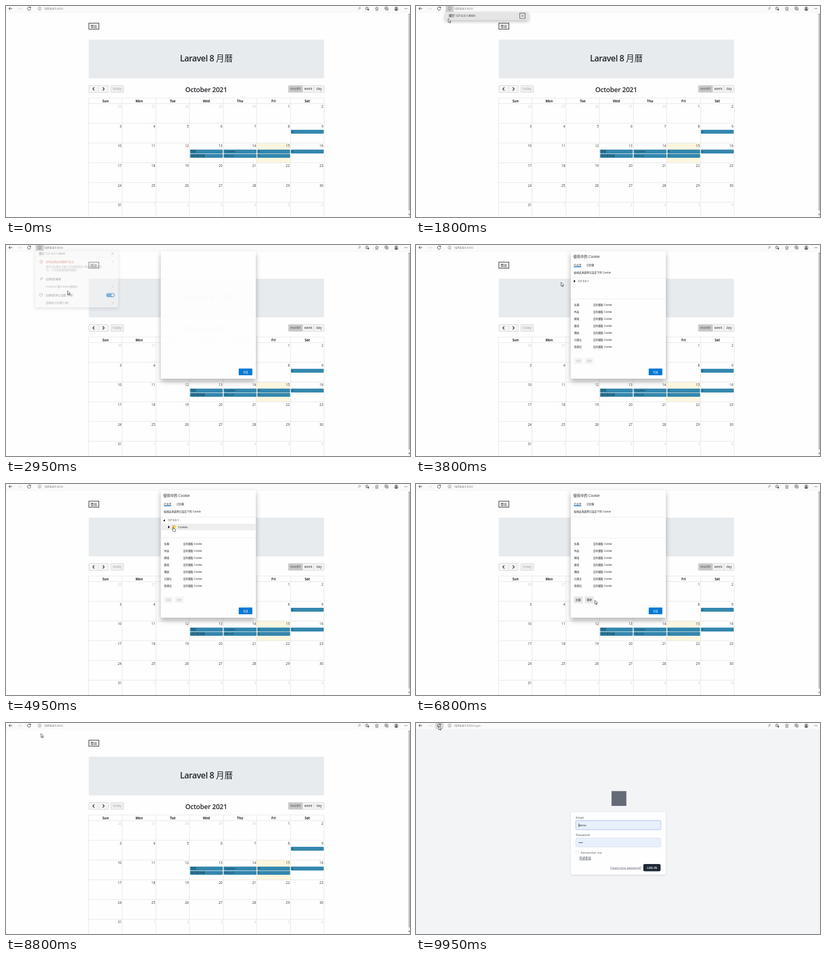
An HTML page for the animation above (10000 ms loop, 750 px wide and 392 px high).

```html
<!DOCTYPE html>
<html lang="zh-Hant">
<head>
<meta charset="utf-8">
<title>月曆</title>
<style>
html, body { margin: 0; width: 100%; height: 100%; overflow: hidden; background: #fefefe; }
svg { position: absolute; left: 0; top: 0; width: 100vw; height: 100vh; }
text { font-family: 'Open Sans', 'Noto Sans CJK TC', 'Noto Sans CJK', sans-serif; white-space: pre; }
#modal { transform-origin: 375.5px 129.9px; }
#modal .sheet { filter: drop-shadow(0 5px 5px rgba(0,0,0,.3)); }
#popup .sheet { filter: drop-shadow(0 2px 3px rgba(0,0,0,.28)); }
#login .sheet { filter: drop-shadow(0 1px 1.5px rgba(0,0,0,.14)); }
</style>
</head>
<body>
<svg id="page" viewBox="0 0 750 392"></svg>
<svg id="popup" viewBox="0 0 750 392"></svg>
<svg id="modal" viewBox="0 0 750 392"></svg>
<svg id="pointer" viewBox="0 0 750 392"></svg>
<script>
const $ = id => document.getElementById(id);
const LOOP = 10000, STEP = 50;

// Markup helpers; text is centred vertically on y
const text = (x, y, s, size = 4.8, fill = '#222', extra = '') =>
  `<text x="${x}" y="${y + size * .36}" font-size="${size}" fill="${fill}" ${extra}>${s}</text>`;
const box = (x, y, w, h, fill, extra = '') =>
  `<rect x="${x}" y="${y}" width="${w}" height="${h}" fill="${fill}" ${extra}/>`;
const line = (d, stroke = '#333', w = .8, extra = '') =>
  `<path d="${d}" fill="none" stroke="${stroke}" stroke-width="${w}" ${extra}/>`;
const dot = (x, y, r, fill, extra = '') => `<circle cx="${x}" cy="${y}" r="${r}" fill="${fill}" ${extra}/>`;
const group = (id, body) => `<g id="${id}">${body}</g>`;
const mid = 'text-anchor="middle"', end = 'text-anchor="end"', bold = 'font-weight="600"';

function star(cx, cy, r) {
  let d = '';
  for (let i = 0; i < 10; i++) {
    const a = i * Math.PI / 5 - Math.PI / 2, q = i % 2 ? r * .45 : r;
    d += (i ? 'L' : 'M') + (cx + q * Math.cos(a)).toFixed(2) + ' ' + (cy + q * Math.sin(a)).toFixed(2);
  }
  return line(d + 'Z', '#444', .7);
}

function calendar() {
  const left = 153.5, top = 181.3, cw = 62.43, rh = 36.65;
  const colX = c => left + c * cw, rowY = r => top + r * rh;
  let out = box(0, 12, 750, 380, '#fefefe');
  out += box(153.8, 31.9, 18.6, 11.2, '#f4f4f4', 'stroke="#3c3c3c" stroke-width="1.1"') + text(163.1, 37.6, '登出', 6, '#222', mid);
  out += box(153.5, 62.5, 437, 72, '#e7ebee', 'rx="2"');
  out += text(372, 97.5, 'Laravel 8 <tspan font-weight="400" letter-spacing="0">月曆</tspan>', 15.6, '#212529',
    `${mid} ${bold} letter-spacing="-.47"`);
  out += text(371.5, 155.3, 'October 2021', 12.5, '#212529', `${mid} ${bold} letter-spacing="-.25"`);

  const button = (x, w, label, fill, color) =>
    box(x, 147.7, w, 12.8, fill, 'rx="1.3" stroke="#ccc" stroke-width=".7"') +
    text(x + w / 2, 154, label, 6.2, color, mid);
  out += button(153.7, 36.3, '', '#f5f5f5') + line('M171.8 148V160.3', '#d4d4d4', .6);
  out += line('M164 151.2L161.2 154.1L164 157M179.5 151.2L182.3 154.1L179.5 157', '#222', 1.2);
  out += button(194.7, 23.6, 'today', '#f1f1f1', '#a0a0a0');
  out += button(550.5, 21.6, 'week', '#f4f4f4', '#333') + button(572, 18.5, 'day', '#f4f4f4', '#333');
  out += button(524.2, 26.3, 'month', '#c9c9c9', '#444');

  out += box(colX(5), rowY(2), cw, rh, '#fcf6e0');
  let grid = `M${left} 171H590.5`;
  for (let r = 0; r < 6; r++) grid += `M${left} ${rowY(r)}H590.5`;
  for (let c = 0; c < 8; c++) grid += `M${Math.floor(colX(c)) + .5} 171V392`;
  out += line(grid, '#dddddd', .7);
  'Sun Mon Tue Wed Thu Fri Sat'.split(' ').forEach((d, c) =>
    out += text(colX(c) + cw / 2, 176.5, d, 6.1, '#212529', `${mid} font-weight="700"`));
  for (let i = 0; i < 42; i++) {
    const n = i - 4, other = n < 1 || n > 31;
    out += text(colX(i % 7 + 1) - 1.4, rowY(Math.floor(i / 7)) + 5.4,
      n < 1 ? n + 30 : n > 31 ? n - 31 : n, 6.2, other ? '#ccc' : '#333', end);
  }
  [[6, 1, 0, '6'], [3, 2, 0, '你好'], [3, 2, 1, '別的使用者'], [4, 2, 0, '7update'],
   [4, 2, 1, 'HELLO!'], [5, 2, 0, '4'], [5, 2, 1, '7'], [6, 2, 0, '6']].forEach(([c, r, n, s]) => {
    const x = colX(c) + .9, y = rowY(r) + 12.05 + n * 8.1;
    out += box(x, y, cw - 1.6, 7.3, '#3487ae', 'rx="1"') + text(x + 1.2, y + 3.7, s, 5.3, '#173743');
  });
  out += box(746.8, 12, 3.2, 380, '#f1f1f1') + box(747.4, 18, 2.4, 362, '#b9b9b9');
  out += '<path d="M747 17L748.5 14L750 17ZM747 386L748.5 389L750 386Z" fill="#777"/>';
  return out;
}

function login() {
  const field = (y, edge) => box(296.8, y, 157.4, 16.4, '#e8f0fc', `rx="2.4" stroke="${edge}" stroke-width=".8"`);
  return box(0, 12, 750, 380, '#f3f4f6') +
    box(363, 126.5, 27.5, 27.5, '#656b76') +
    box(287.3, 166, 176.3, 115.7, '#fefefe', 'rx="3" class="sheet"') +
    text(296.8, 176, 'Email', 5.7, '#454c58') +
    box(296, 180.7, 159, 18, 'none', 'rx="3" stroke="#d8e0fa" stroke-width="1"') + field(181.5, '#b4c2f0') +
    text(302.2, 190, 'demo', 5.2, '#222') + line('M302.1 186.4V193.5', '#111', .7) +
    text(296.8, 208.3, 'Password', 5.7, '#454c58') + field(213.8, '#d3dae6') +
    [0, 1, 2, 3].map(i => dot(303 + i * 1.9, 222.2, .8, '#222')).join('') +
    box(296.9, 237.6, 5.6, 5.6, '#fff', 'rx="1.2" stroke="#d1d5db" stroke-width=".6"') +
    text(306, 240.5, 'Remember me', 5.6, '#5b6370') +
    text(303, 251.5, '申請會員', 5.5, '#4b5563', 'text-decoration="underline"') +
    text(361, 268.6, 'Forgot your password?', 5.5, '#5b6370', 'text-decoration="underline" letter-spacing="-.06"') +
    box(422, 262, 32, 13.5, '#1f2937', 'rx="2.4"') +
    text(438.2, 268.8, 'LOG IN', 4.8, '#fff', `${mid} font-weight="700" letter-spacing=".3"`);
}

function toolbar() {
  return box(0, 0, 750, 12, '#fafafa') + line('M0 12.2H750', '#ededed', .5) +
    box(35.5, -1, 15.5, 12, '#d9d9d9', 'id="reloadBg" rx="1"') + box(55, -1, 15, 12, '#cfcfcf', 'id="infoBg" rx="1"') +
    line('M11.5 4.8H5.2M8 2L5.2 4.8L8 7.6', '#333', .9) + line('M22.5 4.8H28.7M26 2L28.7 4.8L26 7.6', '#d5d5d5', .8) +
    line('M45.3 3A3 3 0 1 0 45.9 5.2M45.8 1.4V3.5H43.6', '#333', .9) +
    line('M62.4 4.3V6.7M62.4 2.7V3.5', '#666', .7) + dot(62.4, 4.8, 2.9, 'none', 'stroke="#666" stroke-width=".6"') +
    text(71, 4.9, '127.0.0.1<tspan fill="#858585">:8000<tspan id="route">/login</tspan></tspan>', 5.2, '#222') +
    dot(656.6, 3.8, 1.6, 'none', 'stroke="#777" stroke-width=".7"') + line('M655.5 5L653.4 7.1', '#777', .9) +
    star(670, 4.6, 3.2) + dot(672.6, 6.8, 1.5, '#555') + star(688.5, 4.8, 3.2) +
    line('M686 8.4H691', '#444', .5) +
    box(703.4, 1.6, 4.4, 4.6, 'none', 'rx="1" stroke="#444" stroke-width=".7"') +
    box(705, 3.2, 4.4, 4.6, '#fafafa', 'rx="1" stroke="#444" stroke-width=".7"') + line('M707.2 4.2V6.8M705.9 5.5H708.5', '#444', .6) +
    dot(724.5, 4.8, 4.2, '#c9c9c9') + dot(724.5, 3.6, 1.6, '#666') +
    '<path d="M721.4 7.6A3.1 2.4 0 0 1 727.6 7.6A4.2 4.2 0 0 1 721.4 7.6Z" fill="#666"/>' +
    [740.2, 742.3, 744.4].map(x => dot(x, 4.8, .65, '#333')).join('');
}

function siteInfo() {
  const chevron = y => line(`M197.4 ${y - 2}L199.4 ${y}L197.4 ${y + 2}`, '#777', .7);
  return '<clipPath id="cut"><rect id="cutBox" x="54" y="10" width="155" height="0"/></clipPath>' +
    box(54, 12, 154.5, 0, '#ededed', 'id="panel" class="sheet" rx="1.5"') +
    '<g clip-path="url(#cut)">' +
    text(61, 18, '關於 127.0.0.1:8000', 5.4) +
    box(192.7, 13.2, 10, 10, 'none', 'id="focus" stroke="#333" stroke-width=".8"') + line('M195.6 16L200 20.4M200 16L195.6 20.4', '#444', .6) +
    line('M54 24H208', '#dedede', .5) +
    dot(65.5, 33, 2.8, 'none', 'stroke="#c42b1c" stroke-width=".7"') + line('M65.5 31.4V33.4M65.5 34V34.7', '#c42b1c', .7) +
    text(74, 33, '您對此網站的連線不安全', 4.75, '#c42b1c') + chevron(33) +
    text(74, 42.6, '請勿在此網站上輸入任何敏感資訊 (例如密碼或信用', 4.6, '#777') +
    text(74, 48.8, '卡)，它可能會被攻擊者竊取。', 4.6, '#777') +
    dot(66.4, 64, 1.7, 'none', 'stroke="#444" stroke-width=".7"') + line('M65.2 65.3L62.8 67.6', '#444', .9) +
    text(74, 65, '此網站的權限', 4.7) +
    text(74, 79, 'Cookie (2 個 Cookie 使用中)', 4.7, '#444') + chevron(79) +
    line('M62.5 92.7H68V95.5L65.2 98L62.5 95.5Z', '#444', .8) +
    text(74, 95.3, '此網站的防止追蹤 (平衡)', 4.7) +
    box(186, 91.6, 15.8, 7.4, '#0067b8', 'rx="3.7"') + dot(198, 95.3, 2.3, '#fff') +
    text(74, 109.6, '追蹤器 (已封鎖 0 個)', 4.7, '#444') + chevron(109.6) + '</g>';
}

function cookieDialog() {
  const rows = ['名稱', '內容', '網域', '路徑', '傳送', '已建立', '到期日'];
  const action = (x, label) => `<g class="action">${box(x, 209, 17, 12.6, '#e6e6e6', 'rx="1"')}${text(x + 8.5, 215.3, label, 4.7, '#222', mid)}</g>`;
  return box(287.3, 11.4, 176.5, 237, '#fefefe', 'class="sheet" rx="1.5"') +
    group('content',
      text(292, 22, '使用中的 Cookie', 6.6) +
      text(293, 37.3, '已允許', 4.7) + text(316.4, 37.3, '已封鎖', 4.7) + box(293, 40, 14, 1.2, '#0078d4') +
      text(293, 51, '檢視此頁面時已設定下列 Cookie', 4.75) +
      line('M287.3 61.3H463.8M287.3 100.3H463.8', '#e3e3e3', .6) +
      group('tree',
        '<path id="closed" d="M293 64.8L296 67.3L293 69.8Z"/><path id="opened" d="M295 65.2V69H291.6Z"/>' +
        text(300, 67.3, '127.0.0.1', 4.9) +
        group('branch', box(287.3, 74, 176.5, 11.8, '#eeeeee', 'id="hover"') +
          '<path d="M301 77.3L304 79.9L301 82.5Z"/>' +
          box(308.6, 77, 6.4, 5.6, '#f0b93c', 'rx=".6"') + box(308.6, 78.4, 6.4, 4.2, '#ffd768', 'rx=".5"') +
          text(319.5, 80, 'Cookies', 4.9))) +
      rows.map((s, i) => text(293.6, 111.2 + i * 13, s, 4.7) + text(328.8, 111.2 + i * 13, '沒有選取 Cookie', 4.7)).join('') +
      action(292.8, '封鎖') + action(313.2, '移除')) +
    box(432, 229.5, 25.3, 12.5, '#0078d4', 'rx="1"') + text(444.7, 235.8, '完成', 4.8, '#fff', mid);
}

$('page').innerHTML = group('calendar', calendar()) + group('login', login()) + toolbar();
$('popup').innerHTML = siteInfo();
$('modal').innerHTML = cookieDialog();
$('pointer').innerHTML =
  '<path id="arrow" d="M0 0V7.2L1.7 5.7L2.9 8.2L4 7.7L2.9 5.3H5.1Z" fill="#fff" stroke="#111" stroke-width=".65"/>' +
  '<path id="hand" d="M.2 .6Q1-.3 1.7.6V3.2L4.4 3.7Q5.3 4 5.2 5L4.6 8.2H1.2L-1.3 5.2Q-1.2 4.2-.2 4.6L.2 5Z" fill="#fff" stroke="#111" stroke-width=".65"/>';

// Pointer stops: time, x, y
const path = [
  [250, 668, -9], [400, 660, 3], [850, 20, 4], [1000, 34, 5], [1250, 61, 4], [1600, 61, 4], [1800, 60, 23.5],
  [2150, 64, 36], [2650, 114, 81], [2950, 114.3, 85], [3300, 118, 85], [3950, 293, 67], [4400, 293, 67],
  [4850, 309.5, 80], [5350, 309.5, 80], [6150, 320, 214], [6500, 320, 214], [6800, 332, 216],
  [7300, 448, 237], [7750, 448, 237], [8400, 130, 60], [9000, 42.2, 5.5]
];
const clamp = v => Math.min(1, Math.max(0, v));
const ramp = (t, a, b) => clamp((t - a) / (b - a));
const smooth = p => p * p * (3 - 2 * p);

function pointerAt(t) {
  const i = path.findIndex(p => p[0] > t);
  if (i < 0) return path[path.length - 1].slice(1);
  if (i === 0) return [-20, -20];
  const [t0, x0, y0] = path[i - 1], [t1, x1, y1] = path[i], k = smooth(ramp(t, t0, t1));
  return [x0 + (x1 - x0) * k, y0 + (y1 - y0) * k];
}

const show = (el, on) => el.style.display = on ? '' : 'none';
const during = (t, a, b) => t >= a && t < b;

function draw(t) {
  const loggedOut = t >= 9550;
  show($('calendar'), !loggedOut);
  show($('login'), loggedOut);
  show($('route'), loggedOut);
  show($('reloadBg'), t >= 8950);
  show($('infoBg'), during(t, 1200, 3000));

  const h = t < 1850 ? 14.5 : 14.5 + 91.5 * smooth(ramp(t, 1800, 1950));
  const leave = ramp(t, 2850, 3000);
  show($('popup'), during(t, 1700, 3000));
  $('panel').setAttribute('height', h);
  $('panel').setAttribute('fill', t < 1850 ? '#e5e5e5' : '#f5f5f5');
  $('cutBox').setAttribute('height', h + 2);
  show($('focus'), t < 2700);
  $('popup').style.opacity = 1 - leave * .86;
  $('popup').style.transform = `translateY(${-leave * 3}px)`;

  const shut = ramp(t, 7600, 7850);
  show($('modal'), during(t, 2850, 7850));
  $('modal').style.opacity = t < 3050 ? [.6, .9, .985, 1][Math.floor((t - 2850) / 50)] :
    1 - .015 * ramp(t, 7600, 7700) - .985 * ramp(t, 7700, 7850);
  $('modal').style.transform = shut
    ? `translateY(${-shut}px) perspective(600px) rotateX(${shut * 8}deg) scale(${1 + shut * .042}, ${1 + shut * .075})` : 'none';
  show($('content'), t >= 3050);
  show($('tree'), t < 6500);
  show($('closed'), t < 4350);
  show($('opened'), t >= 4350);
  show($('branch'), t >= 4350);
  show($('hover'), t >= 4700);
  document.querySelectorAll('.action').forEach(a => a.style.opacity = t < 5250 ? .3 : 1);

  const [x, y] = pointerAt(t), hand = during(t, 4750, 5450);
  show($('hand'), hand);
  show($('arrow'), !hand);
  for (const id of ['hand', 'arrow']) $(id).setAttribute('transform', `translate(${x} ${y})`);
}

const start = performance.now();
function tick() {
  const t = (performance.now() - start) % LOOP;
  draw(Math.floor(t / STEP) * STEP);
  requestAnimationFrame(tick);
}
tick();
</script>
</body>
</html>
```
